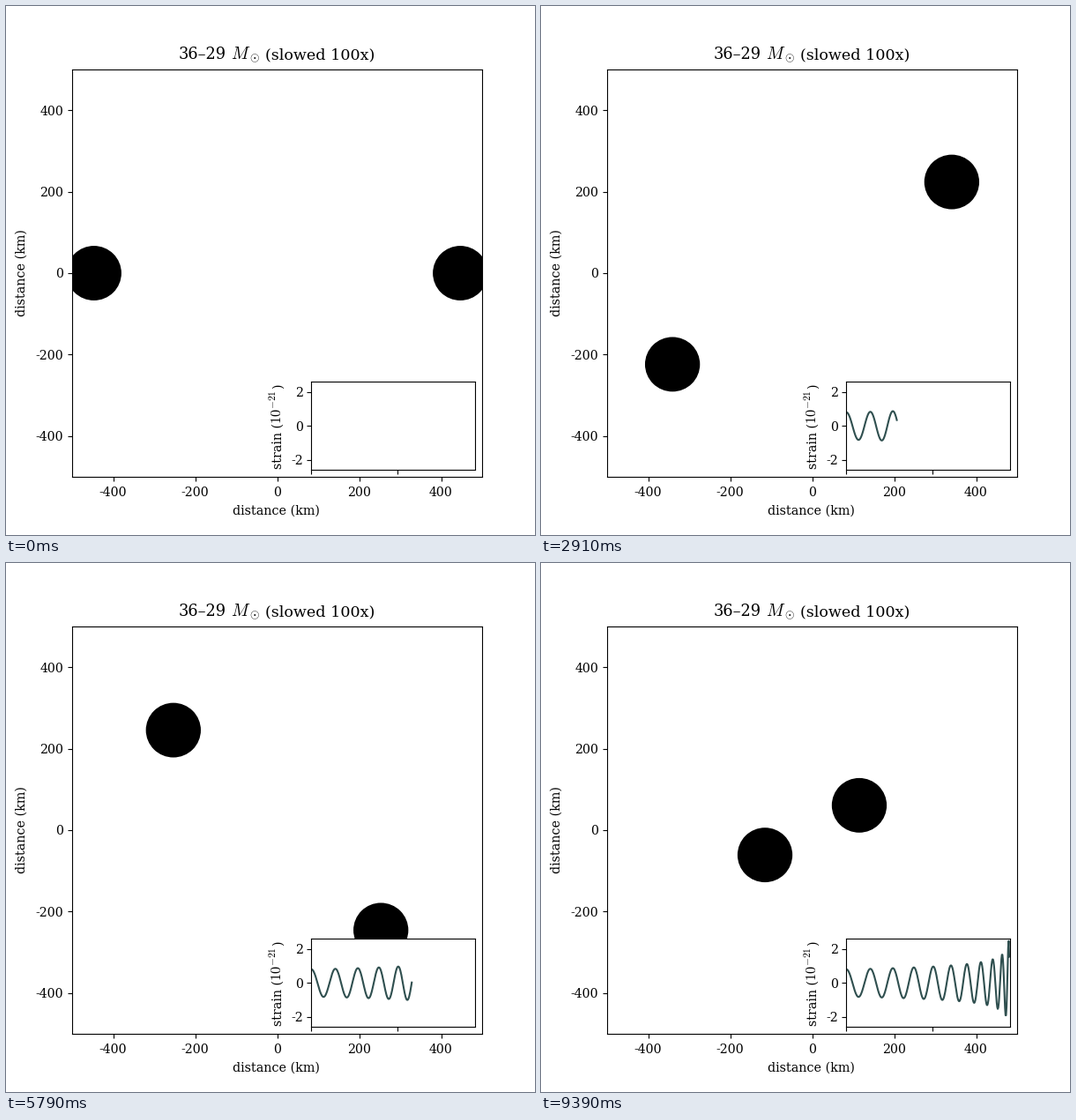
These frames come from a looping animation (600 by 600 pixels, 9420 ms). A matplotlib script:

```python
import numpy as np
import matplotlib.pyplot as plt
from matplotlib.animation import FuncAnimation
from matplotlib.patches import Circle

SIZE = 600
FRAMES, STEP = 314, 30

# Units: seconds (G = c = 1), distances shown in km
SUN = 4.9265e-6
LIGHT = 299792.458
MPC = 1.0292712e14
M1, M2 = 36 * SUN, 29 * SUN
TOTAL = M1 + M2
CHIRP = (M1 * M2) ** 0.6 / TOTAL ** 0.2
OMEGA = np.pi * 35
T_MERGE = 5 / 256 * CHIRP * (CHIRP * OMEGA) ** (-8 / 3)

# Newtonian inspiral, cut just before the merger
t = np.linspace(0, 0.9928 * T_MERGE, FRAMES)
left = 1 - t / T_MERGE
phase = 1.6 * OMEGA * T_MERGE * (1 - left ** 0.625)
radius = 0.5 * (TOTAL / OMEGA ** 2) ** (1 / 3) * LIGHT * left ** 0.25
x, y = radius * np.cos(phase), radius * np.sin(phase)
amp = 4 * CHIRP * (CHIRP * OMEGA) ** (2 / 3) / (410 * MPC) * 1e21
strain = amp * left ** -0.25 * np.cos(2 * phase)

plt.rcParams.update({
    "font.family": "DejaVu Serif",
    "font.size": 10.2,
    "mathtext.fontset": "cm",
    "axes.unicode_minus": False,
})
fig = plt.figure(figsize=(6, 6), dpi=100, facecolor="white")


def axes_px(x0, top, w, h):
    return fig.add_axes([x0 / SIZE, 1 - (top + h) / SIZE, w / SIZE, h / SIZE])


def label(px, py, text, size, ha="left", rotation=0):
    fig.text(px / SIZE, 1 - py / SIZE, text, size=size, ha=ha, va="baseline",
             rotation=rotation, rotation_mode="anchor")


ax = axes_px(75, 72, 465, 462)
ax.set(xlim=(-500, 500), ylim=(-500, 500))
ticks = range(-400, 401, 200)
names = [str(v) for v in ticks]
ax.set_xticks(ticks, names)
ax.set_yticks(ticks, names)
ax.tick_params(axis="x", pad=4.2)
holes = [ax.add_patch(Circle((0, 0), 67, color="black", lw=0)) for _ in range(2)]

inset = axes_px(346.36, 426.36, 186, 100)
inset.set(xlim=(0, T_MERGE), ylim=(-2.6, 2.6))
inset.set_xticks([0, 0.1], ["", ""])
inset.set_yticks([-2, 0, 2], ["-2", "0", "2"])
wave, = inset.plot([], [], color="darkslategray", lw=1.5)

label(196, 60.5, "36–29", 12.8)
label(254.5, 60.5, r"$M_\odot$", 14)
label(293.5, 60.5, "(slowed 100x)", 12.6)
label(306.8, 577, "distance (km)", 10.4, ha="center")
label(22, 303, "distance (km)", 10.4, ha="center", rotation=90)
label(312.5, 525, "strain (", 10.3, rotation=90)
label(312.5, 474.5, "$10^{-21}$", 11.8, rotation=90)
label(312.5, 433, ")", 10.3, rotation=90)


def draw(i):
    holes[0].center = x[i], y[i]
    holes[1].center = -x[i], -y[i]
    wave.set_data(t[:i + 1], strain[:i + 1])
    return [*holes, wave]


anim = FuncAnimation(fig, draw, frames=FRAMES, interval=STEP, repeat=True,
                     repeat_delay=0, blit=False)
plt.show()
```
